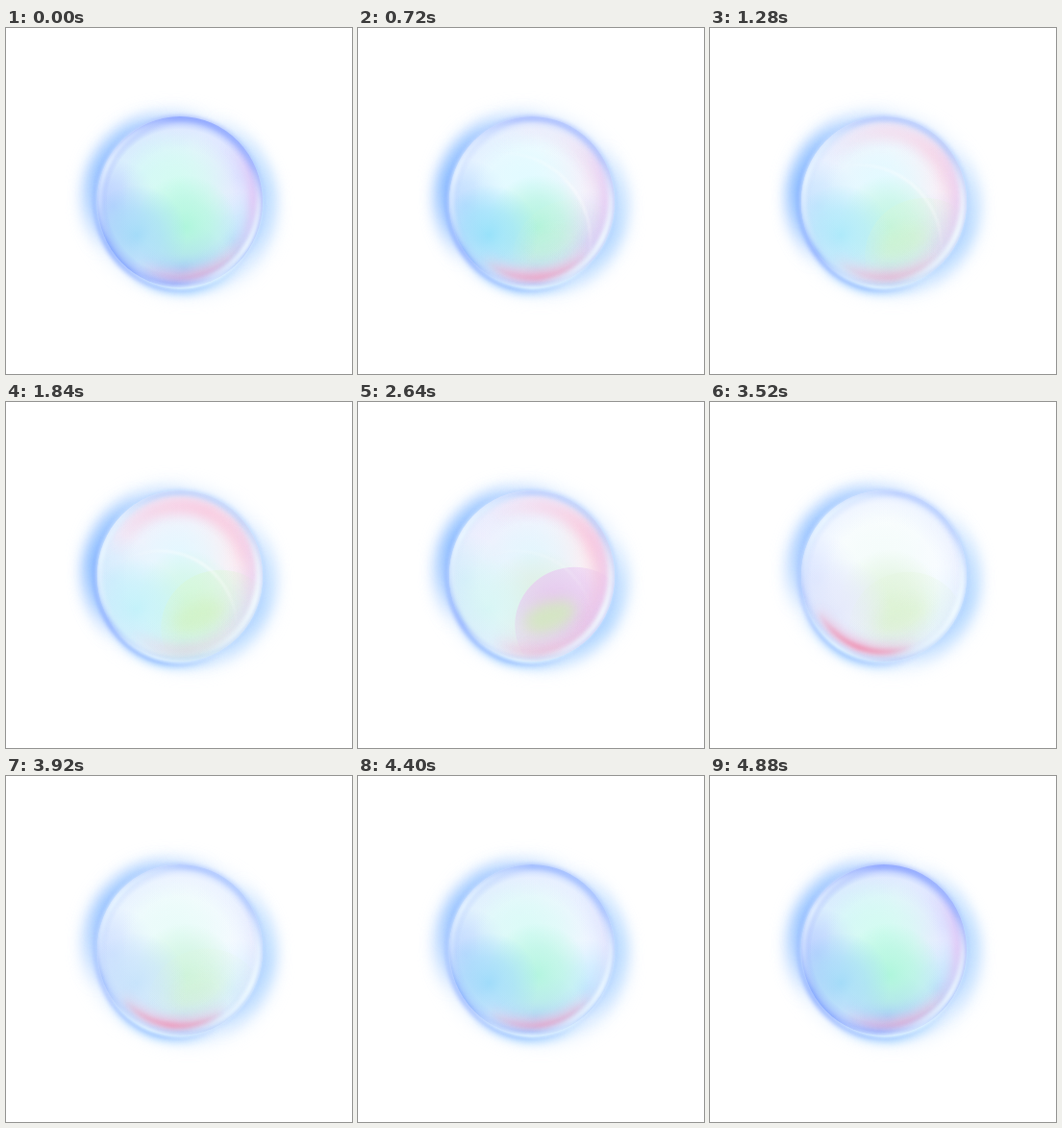
Animation, 360 px wide and 360 px high, one loop 4.96 s. Source, as an HTML page with a canvas:

```html
<!DOCTYPE html>
<html>
<head>
<meta charset="utf-8">
<style>
html, body { margin: 0; height: 100%; overflow: hidden; background: #fff; }
canvas { display: block; }
</style>
</head>
<body>
<canvas id="stage" width="360" height="360"></canvas>
<script>
const ctx = document.getElementById('stage').getContext('2d');
const LOOP = 4960, STEP = 80, CX = 181, CY = 181;
const RAD = Math.PI / 180;
const TIMES = [0, 720, 1840, 2640, 3520, 4400, LOOP];

// Film tints: x, y, radius, then one colour per key time.
const FILM = [
  [181, 122, 62, 'e6f1ff f4fbff faf0fb f8f3fe fcfeff f0f6ff'],
  [145, 150, 55, 'd8f4fc e8f8ff f4f0fc f2effd fafdff e4f7fc'],
  [112, 185, 48, 'bcd4ff bfe0ff d6effd daf2fb e4ebff c2dcff'],
  [240, 155, 58, 'e2e6ff f6effa fdecf2 fdebf0 f9fcff eef4ff'],
  [237, 222, 52, 'c2e6fc dcdcf8 e8e8f8 ecdcf3 eefaff c8ecff'],
  [185, 250, 48, 'a8c8ff d0dcf6 d6f2ee eee4e8 e8ecf6 b4d4fc'],
  [180, 165, 60, 'd2fcf0 e0fbff e2f8ff e2f6fd f4fcfa d9fbf6'],
  [187, 207, 54, 'aff6dc b0f3dc cef7e4 ddeee0 e0f4dc b4f5e0'],
  [136, 215, 52, 'a4dcf8 98e2fa c4f2fa d8f6f5 e6eafb a0dcfa']
].map(([x, y, r, list]) => ({ x, y, r, rgb: parse(list) }));

const RIM = parse('7f99ff 91aaff a5c8ff a0c0ff a0bcff 8aacff');
const FOLD = parse('dcf5d2 dcf5d2 d9f7cf e9c6f2 e0f3d4 dcf5d2');

let seg = 0, mix = 0;

function parse(list) {
  return list.split(' ').map(h => [0, 2, 4].map(i => parseInt(h.slice(i, i + 2), 16)));
}

function seek(t) {
  seg = TIMES.findIndex((v, i) => t >= v && t < TIMES[i + 1]);
  const u = (t - TIMES[seg]) / (TIMES[seg + 1] - TIMES[seg]);
  mix = u * u * (3 - 2 * u);
}

// Blend between neighbouring key values; the last one returns to the first.
function key(...v) {
  return v[seg] + (v[(seg + 1) % v.length] - v[seg]) * mix;
}

function tint(list) {
  return [0, 1, 2].map(i => Math.round(key(...list.map(c => c[i])))).join();
}

function layer(blur, draw) {
  ctx.save();
  if (blur) ctx.filter = `blur(${blur}px)`;
  draw();
  ctx.restore();
}

function oval(x, y, rx, ry, angle = 0) {
  ctx.beginPath();
  ctx.ellipse(x, y, rx, ry, angle * RAD, 0, 2 * Math.PI);
}

function blob(rgb, alpha, blur, ...shape) {
  layer(blur, () => {
    oval(...shape);
    ctx.fillStyle = `rgba(${rgb},${alpha})`;
    ctx.fill();
  });
}

// Ring segment centred on an angle, fading out towards both ends.
function arc(rgb, alpha, width, blur, x, y, rx, ry, angle, spread) {
  const g = ctx.createConicGradient((angle - 180) * RAD, x, y);
  const s = spread / 360;
  [[-1, 0], [-.5, .65], [0, 1], [.5, .65], [1, 0]].forEach(([at, a]) =>
    g.addColorStop(.5 + at * s, `rgba(${rgb},${a * alpha})`));
  layer(blur, () => {
    oval(x, y, rx, ry);
    ctx.strokeStyle = g;
    ctx.lineWidth = width;
    ctx.stroke();
  });
}

function spot(x, y, r, rgb, alpha = 1) {
  const g = ctx.createRadialGradient(x, y, 0, x, y, r);
  g.addColorStop(0, `rgba(${rgb},${alpha})`);
  g.addColorStop(.5, `rgba(${rgb},${alpha * .62})`);
  g.addColorStop(1, `rgba(${rgb},0)`);
  ctx.fillStyle = g;
  ctx.fillRect(x - r, y - r, 2 * r, 2 * r);
}

function halo() {
  blob('196,223,255', .65, 10, CX, CY + 1, 100, 90, 32);
  const left = key(202, 194, 190, 203, 212, 207);
  arc('112,172,255', key(.65, .8, .8, .75, .6, .6), 22, 8, CX, CY, 89, 86, left, 55);
  arc('140,190,255', .4, 14, 7, CX, CY, 90, 88, left + 30, 55);
  const right = key(-8, 22, 24, 35, 18, -2);
  arc('140,196,255', key(.5, .5, .5, .6, .55, .5), 15, 7, CX, CY, 92, 90, right, 60);
  arc('125,195,255', .55, 9, 4, CX, CY, 88, 92, key(84, 100, 105, 108, 116, 94), 42);
}

function film() {
  ctx.fillStyle = '#f6fbff';
  ctx.fillRect(85, 80, 200, 205);
  FILM.forEach(f => spot(f.x, f.y, f.r, tint(f.rgb)));

  // Fold in the lower right with a crisp upper edge
  const strength = key(0, .1, .55, .9, .3, 0);
  layer(0, () => {
    oval(key(222, 222, 222, 224, 205, 212), key(240, 238, 234, 231, 236, 242), 61, 59, -20);
    ctx.clip();
    spot(205, 205, 72, tint(FOLD), strength);
    blob('205,238,180', strength * .8, 7, 200, 223, 28, 15, -20);
  });

  arc('255,255,255', key(0, .45, .5, .2, 0, 0), 3, 1.2,
    key(150, 150, 160, 165, 165, 150), key(222, 222, 235, 235, 235, 222),
    key(92, 92, 80, 80, 80, 92), key(92, 92, 80, 80, 80, 92), key(-35, -35, -58, -65, -65, -35), 60);

  // Soft blue shading inside the rim
  const c = tint(RIM);
  const rim = ctx.createRadialGradient(CX, CY, 55, CX, CY, 89);
  rim.addColorStop(0, `rgba(${c},0)`);
  rim.addColorStop(.6, `rgba(${c},.1)`);
  rim.addColorStop(1, `rgba(${c},${key(.65, .35, .2, .2, .35, .5)})`);
  ctx.fillStyle = rim;
  ctx.fillRect(85, 80, 200, 205);

  // Pink reflections along the upper rim, right side and floor
  arc('252,190,214', key(0, .15, .75, .7, 0, 0), 17, 6, CX, CY, 72, 73, key(-45, -30, -68, -32, -32, -40), 95);
  arc('228,180,240', key(.65, .5, .3, .35, .05, .15), 12, 5, CX, CY, 78, 78, 0, 50);
  const floor = key(76, 85, 85, 75, 110, 80);
  arc('240,180,212', key(.6, .85, .3, .45, .75, .65), 12, 4, CX, CY, 75, 77, floor, 48);
  arc('240,140,172', key(.2, .4, 0, .1, .9, .4), 5, 2, CX, CY, 77, 79, floor, 42);
}

function edges() {
  const c = tint(RIM);
  arc(c, .75, 5, 2.5, CX, CY, 84, 87, -90, 100);
  arc('112,152,255', key(.8, .8, .85, .8, .55, .65), 5, 2.5, CX, CY + 1, 87, 90, 145, 80);
  arc('148,190,255', .55, 4, 2.5, CX, CY, 86, 88, 20, 95);

  // Pale glints on opposite sides and along the floor
  const left = key(208, 202, 195, 210, 222, 213);
  arc('244,255,255', .85, 6, 2.2, CX, CY, 84, 86, left, 58);
  const right = key(33, 28, 18, 28, 26, 31);
  arc('246,255,255', .9, 6, 2.2, CX, CY, 82, 85, right, 60);
  arc('240,255,255', .75, 4, 1.6, CX, CY, 86, 89, key(82, 90, 105, 100, 124, 92), 45);
}

function frame(now) {
  seek(Math.floor(now % LOOP / STEP) * STEP);
  ctx.fillStyle = '#fff';
  ctx.fillRect(0, 0, 360, 360);
  halo();
  ctx.save();
  oval(CX, CY, 86, 89);
  ctx.clip();
  film();
  ctx.restore();
  edges();
  requestAnimationFrame(frame);
}
requestAnimationFrame(frame);
</script>
</body>
</html>
```
